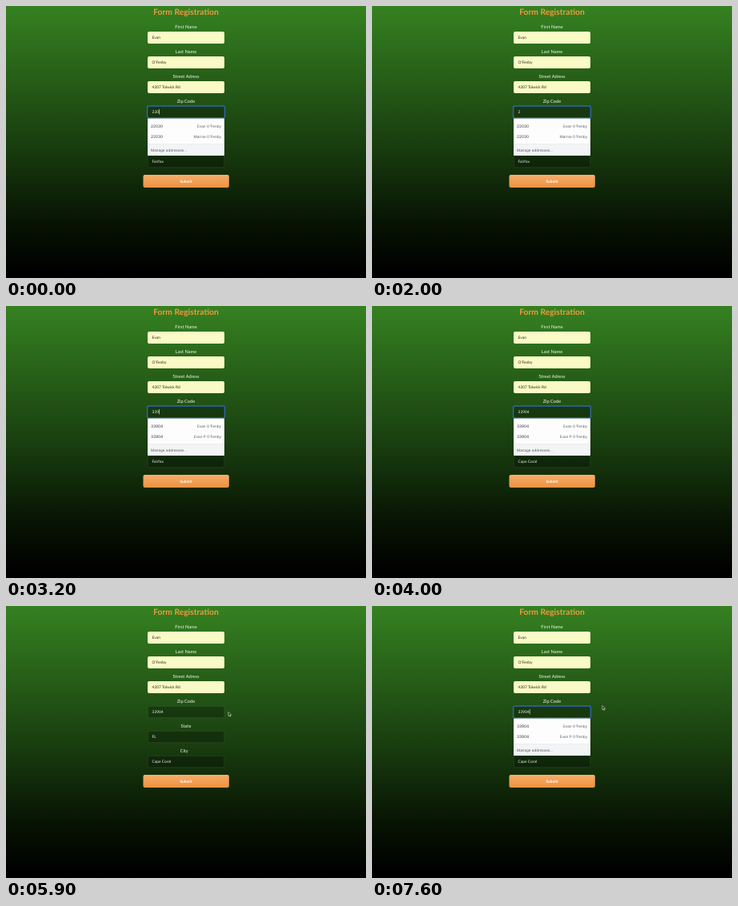
Animation of 450 by 340 pixels, one loop 8 s. Source, as an HTML page:

```html
<!DOCTYPE html>
<html lang="en">
<head>
<meta charset="utf-8">
<title>Form Registration</title>
<style>
  html, body { margin: 0; width: 100%; height: 100%; overflow: hidden; background: #000; }
  svg { display: block; width: 100vw; height: 100vh; }
  text { font-family: Lato, "Open Sans", sans-serif; text-rendering: geometricPrecision; }
  .title { font-size: 10.3px; font-weight: 700; fill: #f2993f; text-anchor: middle; }
  .label { font-size: 5.7px; fill: #f4f8f2; text-anchor: middle; }
  .value { font-size: 4.85px; fill: #f4f8f2; }
  .filled { fill: #26281a; }
  .submit { font-size: 4.85px; font-weight: 700; fill: #fff; text-anchor: middle; }
  .menu text { font-family: Inter, "Liberation Sans", sans-serif; font-size: 4.6px; fill: #5a5d60; }
  .menu .zip { font-size: 4.85px; fill: #303236; }
  .menu .name { text-anchor: end; }
</style>
</head>
<body>
<svg id="stage" viewBox="0 0 450 340" preserveAspectRatio="none">
  <defs>
    <linearGradient id="sky" x1="0" y1="0" x2="0" y2="1">
      <stop offset="0" stop-color="#358121"/>
      <stop offset=".5" stop-color="#193f0f"/>
      <stop offset=".8" stop-color="#071303"/>
      <stop offset=".98" stop-color="#000"/>
    </linearGradient>
    <linearGradient id="orange" x1="0" y1="0" x2="0" y2="1">
      <stop offset="0" stop-color="#f5ae69"/>
      <stop offset="1" stop-color="#ee9140"/>
    </linearGradient>
  </defs>
  <rect width="450" height="340" fill="url(#sky)"/>
</svg>
<script>
const LOOP = 8000;
const STEP = 100;
const LEFT = 177, WIDTH = 96, ROW = 31;
const PERSON = "Evan O'Fenby";

const stage = document.getElementById("stage");

function add(parent, tag, attrs, content) {
  const node = document.createElementNS("http://www.w3.org/2000/svg", tag);
  for (const key in attrs) node.setAttribute(key, attrs[key]);
  if (content !== undefined) node.textContent = content;
  parent.appendChild(node);
  return node;
}

const box = (parent, x, y, width, height, attrs) =>
  add(parent, "rect", { x, y, width, height, ...attrs });
const write = (parent, x, y, cls, content) =>
  add(parent, "text", { x, y, class: cls }, content);
const show = (node, on) => node.setAttribute("visibility", on ? "visible" : "hidden");

// Form
write(stage, 225, 11.3, "title", "Form Registration");

function field(index, label, content, filled) {
  const top = 32 + index * ROW;
  write(stage, index === 5 ? 222.7 : 225, top - 4.3, "label", label);
  if (filled) {
    box(stage, LEFT, top, WIDTH, 15, { rx: 2, fill: "#fafac6" });
  } else {
    box(stage, LEFT + .25, top + .25, WIDTH - .5, 14.5, {
      rx: 2, fill: "#000", "fill-opacity": .28,
      stroke: "#fff", "stroke-opacity": .15, "stroke-width": .5
    });
  }
  return write(stage, 182.6, top + 9.3, filled ? "value filled" : "value", content);
}

field(0, "First Name", "Evan", true);
field(1, "Last Name", "O'Fenby", true);
field(2, "Street Adress", "4207 Tolwick Rd", true);
const zip = field(3, "Zip Code", "");
const state = field(4, "State", "");
const city = field(5, "City", "");

box(stage, 171.5, 211, 107.3, 16, { rx: 2, fill: "url(#orange)" });
write(stage, 225, 220.8, "submit", "Submit");

const ring = box(stage, 176.5, 125, 97, 15.2, { rx: 2, fill: "none", "stroke-width": 1.3 });
const caret = box(stage, 0, 129, .6, 6.4, { fill: "#fff" });

// Suggestion menus
function menu(rows, cut) {
  const group = add(stage, "g", { class: "menu" });
  const foot = 146.5 + rows.length * 13;
  const bottom = cut || foot + 14.5;
  box(group, LEFT - .6, 140.6, WIDTH + 1.2, bottom - 140, { rx: 1.5, fill: "#000", "fill-opacity": .25 });
  box(group, LEFT, 140.4, WIDTH, bottom - 140.4, { rx: 1.2, fill: "#fdfdfd" });
  rows.forEach(([code, name], i) => {
    write(group, 181, 151.8 + i * 13, "zip", code);
    write(group, 269, 151.8 + i * 13, "name", name);
  });
  if (!cut) {
    box(group, LEFT, foot, WIDTH, 14.5, { rx: 1.2, fill: "#f2f4f5" });
    box(group, LEFT, foot - .2, WIDTH, .5, { fill: "#dcdfe0" });
    write(group, 181, foot + 9.1, "", "Manage addresses...");
  }
  return group;
}

const wide = [
  ["33904", PERSON + ", CAPE CORAL"],
  ["33462", PERSON + ", Lantana"],
  ["33904", "Evan P O'Fenby"]
];
const near = [["33904", PERSON], ["33904", "Evan P O'Fenby"]];
const menus = {
  first: menu([["22030", PERSON], ["22030", "Marnie O'Fenby"]]),
  cut: menu(wide, 181),
  wide: menu(wide),
  near: menu(near),
  black: box(stage, 175.4, 140, 99.2, 41, { fill: "#000" })
};

// Translucent panel that flashes at the left edge
const panel = add(stage, "g", {});
box(panel, -1, 89.7, 25, 40.3, { fill: "#0a1c06", "fill-opacity": .55 });
add(panel, "path", {
  d: "M0 90H24V130", fill: "none", stroke: "#7d8f76",
  "stroke-opacity": .55, "stroke-width": .6, "stroke-dasharray": "1.5 1"
});
add(panel, "path", {
  d: "M0 105H22M0 120H22", stroke: "#5b4a30", "stroke-opacity": .4, "stroke-width": .5
});

// Pointers, both drawn around their own hot spot
const arrow = add(stage, "path", {
  d: "M0 0V5L1.2 3.9L2 5.7L2.9 5.3L2.1 3.6H3.6Z",
  fill: "#111", stroke: "#f4f4f4", "stroke-width": .6, "stroke-linejoin": "round"
});
const beam = add(stage, "path", {
  d: "M-1.2 -3.2Q0 -3.2 0 -2.2V2.2Q0 3.2 -1.2 3.2M1.2 -3.2Q0 -3.2 0 -2.2M0 2.2Q0 3.2 1.2 3.2",
  fill: "none", stroke: "#e6ece4", "stroke-width": .7
});

// Each track lists [start time, value]
const typed = [
  [0, "220"], [200, "2203"], [400, "22030"],
  [1700, "2203"], [1800, "220"], [1900, "22"], [2000, "2"], [2400, ""],
  [2700, "3"], [2900, "33"], [3200, "339"], [3400, "3390"], [3500, "33904"]
];
const opened = [
  [0, "first"], [2400, ""], [2700, "cut"], [2800, "wide"], [3200, "near"],
  [4900, ""], [6500, "black"], [6600, "near"]
];
const blink = [
  [0, 1], [900, 0], [1400, 1], [2000, 0], [2400, 1], [4000, 0],
  [4500, 1], [4900, 0], [6500, 1], [7000, 0], [7500, 1]
];
const focus = [[0, "#2c63ae"], [4900, "none"], [6500, "#6f8269"], [6600, "#2c63ae"]];
const pointer = [[0, ""], [4500, "arrow"], [6300, "beam"], [7300, "arrow"]];
const path = [
  [4500, 279, 132], [5000, 330, 137.5], [5100, 330.3, 137.8], [5300, 330.3, 137.8],
  [5900, 278, 132.5], [6000, 278, 132.5], [6100, 276.8, 132], [6200, 276.8, 132],
  [6300, 272, 132], [7200, 272, 132], [7300, 276, 130], [7600, 288, 124.6]
];

const at = (track, t) => track.reduce((value, [start, next]) => t >= start ? next : value, track[0][1]);

function place(t) {
  const next = path.findIndex(p => p[0] > t);
  if (next < 0) return path[path.length - 1].slice(1);
  if (next === 0) return path[0].slice(1);
  const a = path[next - 1], b = path[next];
  const k = (t - a[0]) / (b[0] - a[0]);
  return [a[1] + (b[1] - a[1]) * k, a[2] + (b[2] - a[2]) * k];
}

function render(time) {
  const t = Math.floor(time % LOOP / STEP) * STEP;
  const moved = t >= 4000;
  zip.textContent = at(typed, t);
  state.textContent = moved ? "FL" : "VA";
  city.textContent = moved ? "Cape Coral" : "Fairfax";

  ring.setAttribute("stroke", at(focus, t));
  caret.setAttribute("x", 182.8 + (zip.textContent ? zip.getComputedTextLength() : 0));
  show(caret, at(blink, t));

  const current = at(opened, t);
  for (const key in menus) show(menus[key], key === current);
  show(panel, current === "black");

  const kind = at(pointer, t);
  const move = `translate(${place(t).join(" ")})`;
  arrow.setAttribute("transform", move);
  beam.setAttribute("transform", move);
  show(arrow, kind === "arrow");
  show(beam, kind === "beam");
}

const begin = performance.now();
function tick() {
  render(performance.now() - begin);
  requestAnimationFrame(tick);
}
tick();
</script>
</body>
</html>
```
